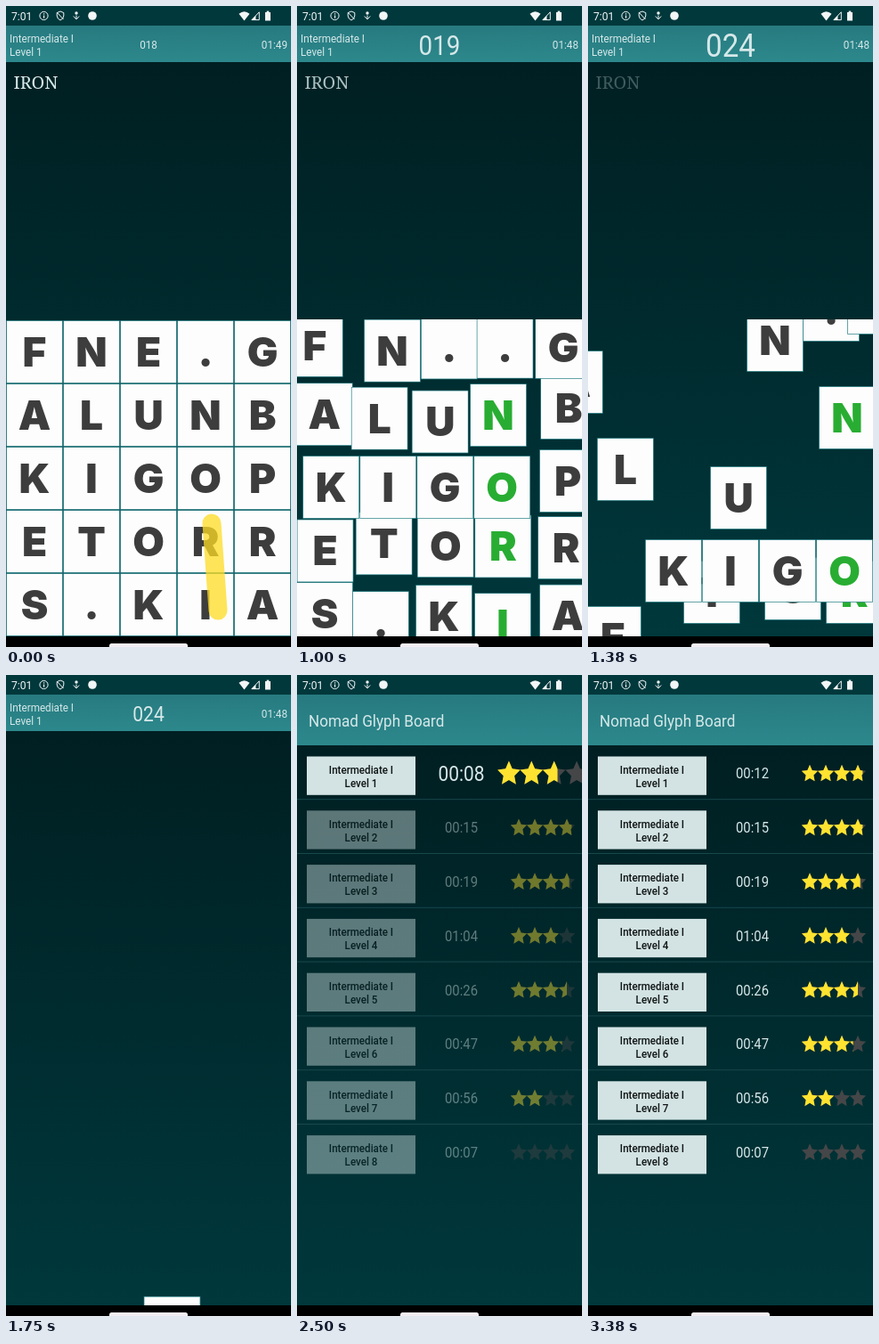
Animation, 320 px wide and 720 px high, one loop 3.5 s. Source, as an HTML page with a canvas:

```html
<!DOCTYPE html>
<html lang="en">
<head>
<meta charset="utf-8">
<title>Word puzzle</title>
<style>
  html, body { margin: 0; width: 100%; height: 100%; overflow: hidden; background: #000; }
  canvas { display: block; width: 320px; height: 720px; }
</style>
</head>
<body>
<canvas id="stage"></canvas>
<script>
const LOOP = 3500, STEP = 125;
const W = 320, H = 720, BOTTOM = 708, BOARD_TOP = 353, CELL_W = 64, CELL_H = 71;
const SQUEEZE = 0.9; // the phone screen is shown narrower than it is
const TEAL = '#2a8388', PALE = '#d6e8e9', YELLOW = '#ffe330', GREEN = '#28ad32';
const SANS = 'Roboto, sans-serif', SERIF = '"Noto Serif", serif', HEAVY = 'Inter, sans-serif';

const LETTERS = ['FNE.G', 'ALUNB', 'KIGOP', 'ETORR', 'S.KIA'];
const BREAKUP = 831, DRIFT_TIME = 544;
// how far each tile has drifted after DRIFT_TIME, and how late it sets off
const DRIFT = [
  [[-125, -73], [114, -13], [113, -47], [99, -55], [115, -52]],
  [[-47, -37, 100], [-54, 61, 45], [9, 93, 20], [67, 3, 90], [177, -83]],
  [[64, 104], [64, 104], [64, 104], [64, 104], [166, 31]],
  [[-4, 108], [43, 57, 75], [70, 53], [75, 57], [146, 73]],
  [[-10, 104], [-21, 208], [52, 135], [73, 229], [166, 130]]
];
const TIMES = ['00:12', '00:15', '00:19', '01:04', '00:26', '00:47', '00:56', '00:07'];
const STARS = [3.8, 3.8, 3.65, 3, 3.5, 3.2, 2, 0];

const canvas = document.getElementById('stage');
const ctx = canvas.getContext('2d');
const dpr = window.devicePixelRatio || 1;
canvas.width = W * dpr;
canvas.height = H * dpr;

const clamp = v => Math.max(0, Math.min(1, v));
const ramp = (t, start, length) => clamp((t - start) / length);
const easeOut = p => 1 - (1 - p) ** 2;

// grows to a peak, stays, then shrinks back to 1
function pop(t, start, end, peak) {
  const up = easeOut(ramp(t, start, 400));
  const down = easeOut(1 - ramp(t, end, 400));
  return 1 + (peak - 1) * Math.min(up, down);
}

function box(x, y, w, h, color) {
  ctx.fillStyle = color;
  ctx.fillRect(x, y, w, h);
}

function group(draw) {
  ctx.save();
  draw();
  ctx.restore();
}

// y is the middle of the capitals
function text(str, x, y, size, { color = PALE, align = 'left', weight = 400, family = SANS, scale = SQUEEZE } = {}) {
  group(() => {
    ctx.translate(x, y + size * 0.357);
    ctx.scale(scale, 1);
    ctx.font = `${weight} ${size}px ${family}`;
    ctx.textAlign = align;
    ctx.fillStyle = color;
    ctx.fillText(str, 0, 0);
  });
}

function shape(points, color) {
  ctx.beginPath();
  points.forEach(([x, y]) => ctx.lineTo(x, y));
  ctx.closePath();
  ctx.fillStyle = color;
  ctx.fill();
}

function ring(x, y, r) {
  ctx.beginPath();
  ctx.arc(x, y, r, 0, Math.PI * 2);
  ctx.stroke();
}

function disc(x, y, r) {
  ctx.beginPath();
  ctx.arc(x, y, r, 0, Math.PI * 2);
  ctx.fill();
}

// returns the fill of the page body
function backdrop(headerEnd) {
  const body = ctx.createLinearGradient(0, headerEnd, 0, BOTTOM);
  body.addColorStop(0, '#001f22');
  body.addColorStop(1, '#00383c');
  box(0, 0, W, 22, '#00383c');
  box(0, headerEnd, W, BOTTOM - headerEnd, body);
  const head = ctx.createLinearGradient(0, 22, 0, headerEnd);
  head.addColorStop(0, '#277a7f');
  head.addColorStop(1, '#2c888c');
  box(0, 22, W, headerEnd - 22, head);
  return body;
}

function statusBar() {
  const white = '#f2f6f6';
  text('7:01', 6, 11, 13.5, { color: white });
  ctx.strokeStyle = ctx.fillStyle = white;
  ctx.lineWidth = 1;
  ring(42.5, 11, 4.6);
  box(42, 10.5, 1.2, 3.2, white);
  box(42, 8.2, 1.2, 1.3, white);

  ctx.stroke(new Path2D('M61 6 L64.8 7.6 V11 Q64.5 14.5 61 16 Q57.5 14.5 57.2 11 V7.6 Z M57 7 L64.5 15'));

  disc(79, 8, 1.7);
  ctx.stroke(new Path2D('M75.8 11.5 L79 15 L82.2 11.5 M79 10.5 V15'));
  disc(97, 11, 4.8);

  ctx.fill(new Path2D('M267.5 16.5 L261.5 8.8 Q267.5 3.8 273.5 8.8 Z'));
  ctx.stroke(new Path2D('M284.3 6.8 V15.6 H276 Z'));
  shape([[280.5, 10.8], [280.5, 16], [275.3, 16]], white);
  box(291, 7, 6, 9.5, white);
  box(292.7, 5.6, 2.6, 2, white);
}

function tile(row, col, t) {
  const [dx, dy, lag = 0] = DRIFT[row][col];
  const k = Math.max(0, (t - BREAKUP - lag) / (DRIFT_TIME - lag)) ** 2;
  const x = col * CELL_W + dx * k;
  const y = BOARD_TOP + row * CELL_H + dy * k;
  box(x + 0.2, y + 0.2, CELL_W - 0.4, CELL_H - 0.4, TEAL);
  box(x + 0.9, y + 0.9, CELL_W - 1.8, CELL_H - 1.8, '#fdfdfd');

  let letter = LETTERS[row][col], scale = 1;
  if (row === 0 && col === 2) {
    const turn = Math.cos(Math.PI * ramp(t, 125, 600));
    if (turn < 0) letter = '.';
    scale = Math.abs(turn);
  }
  const found = t >= 750 && col === 3 && row > 0;
  text(letter, x + CELL_W / 2, y + 35.5, 46, {
    color: found ? GREEN : '#3d3d3d', align: 'center', weight: 900, family: HEAVY, scale
  });
}

function swipe(t) {
  const p = ramp(t, 0, 500);
  ctx.strokeStyle = 'rgba(255, 221, 35, 0.75)';
  ctx.lineWidth = 21;
  ctx.lineCap = 'round';
  ctx.beginPath();
  ctx.moveTo(238, 679);
  ctx.lineTo(231 - 3.5 * p, 581 - 131 * p);
  ctx.stroke();
}

function gamePage(t) {
  backdrop(63);
  text('Intermediate I', 4, 36, 13);
  text('Level 1', 4, 51, 13);
  const points = 18 + Math.max(0, Math.min(6, Math.floor((t - 925) / 75)));
  text('0' + points, W / 2, 43.5, 13 * pop(t, 800, 1450, 2.83), { align: 'center' });
  text(t < 300 ? '01:49' : '01:48', 316, 43.5, 13, { align: 'right' });

  group(() => {
    ctx.globalAlpha = 1 - ramp(t, 850, 750);
    text('IRON', 8.5, 86, 19.9, { family: SERIF, scale: 1 });
  });

  group(() => {
    ctx.beginPath();
    ctx.rect(0, BOARD_TOP - 1, W, BOTTOM - BOARD_TOP + 1);
    ctx.clip();
    for (let row = 4; row >= 0; row--)
      for (let col = 0; col < 5; col++) tile(row, col, t);
    if (t < 750) swipe(t);
  });
}

function star(x, y, r, color) {
  const points = [];
  for (let i = 0; i < 10; i++) {
    const a = i * Math.PI / 5 - Math.PI / 2, d = i % 2 ? r * 0.48 : r;
    points.push([x + d * Math.cos(a) * 0.93, y + 0.5 + d * Math.sin(a)]);
  }
  shape(points, color);
}

function rating(y, value, scale) {
  const pitch = 18 * scale;
  const left = 276 - 2 * pitch;
  const four = color => {
    for (let i = 0; i < 4; i++) star(left + (i + 0.5) * pitch, y, 10.3 * scale, color);
  };
  four('#454648');
  group(() => {
    ctx.beginPath();
    ctx.rect(left, y - 20, pitch * value, 40);
    ctx.clip();
    four(YELLOW);
  });
}

function listRow(i, t, body) {
  const y = 110.5 + i * 60.8;
  const count = ramp(t, 2020, 688);
  const scale = i ? 1 : pop(t, 2000, 2708, 1.41);
  const time = i ? TIMES[i] : '00:' + String(Math.floor(12 * count)).padStart(2, '0');
  const label = { color: '#101414', align: 'center', weight: 500 };
  box(11, y - 19, 122, 43.3, '#d3e3e3');
  text('Intermediate I', 72, y - 4.3, 12.9, label);
  text('Level ' + (i + 1), 72, y + 10.7, 12.9, label);
  text(time, 184.5, y, 16.5 * scale, { align: 'center' });
  rating(y, i ? STARS[i] : STARS[0] * count, scale);
  // a veil of the page fill fades the whole row as one
  if (i) group(() => {
    ctx.globalAlpha = 1 - ramp(t, 2150, 800);
    box(0, y - 30, W, 58, body);
  });
  if (i < 7) box(0, y + 28.7, W, 1, '#17484b');
}

function listPage(t) {
  const body = backdrop(79);
  text('Nomad Glyph Board', 13, 51.5, 19);
  for (let i = 0; i < 8; i++) listRow(i, t, body);
}

function page(x, draw, t) {
  if (x <= -W || x >= W) return;
  group(() => {
    ctx.translate(x, 0);
    ctx.beginPath();
    ctx.rect(0, 0, W, BOTTOM);
    ctx.clip();
    draw(t);
  });
}

function render(t) {
  ctx.setTransform(dpr, 0, 0, dpr, 0, 0);
  box(0, 0, W, H, '#000');
  const travel = W + 16;
  const shift = travel * (1 - (1 - ramp(t, 1894, 400)) ** 3);
  page(shift, gamePage, t);
  page(shift - travel, listPage, t);
  statusBar();
  ctx.fillStyle = '#f3eef3';
  ctx.beginPath();
  ctx.roundRect(116, 716, 88, 6, 2.5);
  ctx.fill();
}

const begin = performance.now();
function tick() {
  const t = (performance.now() - begin) % LOOP;
  render(Math.floor(t / STEP) * STEP);
  requestAnimationFrame(tick);
}
tick();
</script>
</body>
</html>
```
